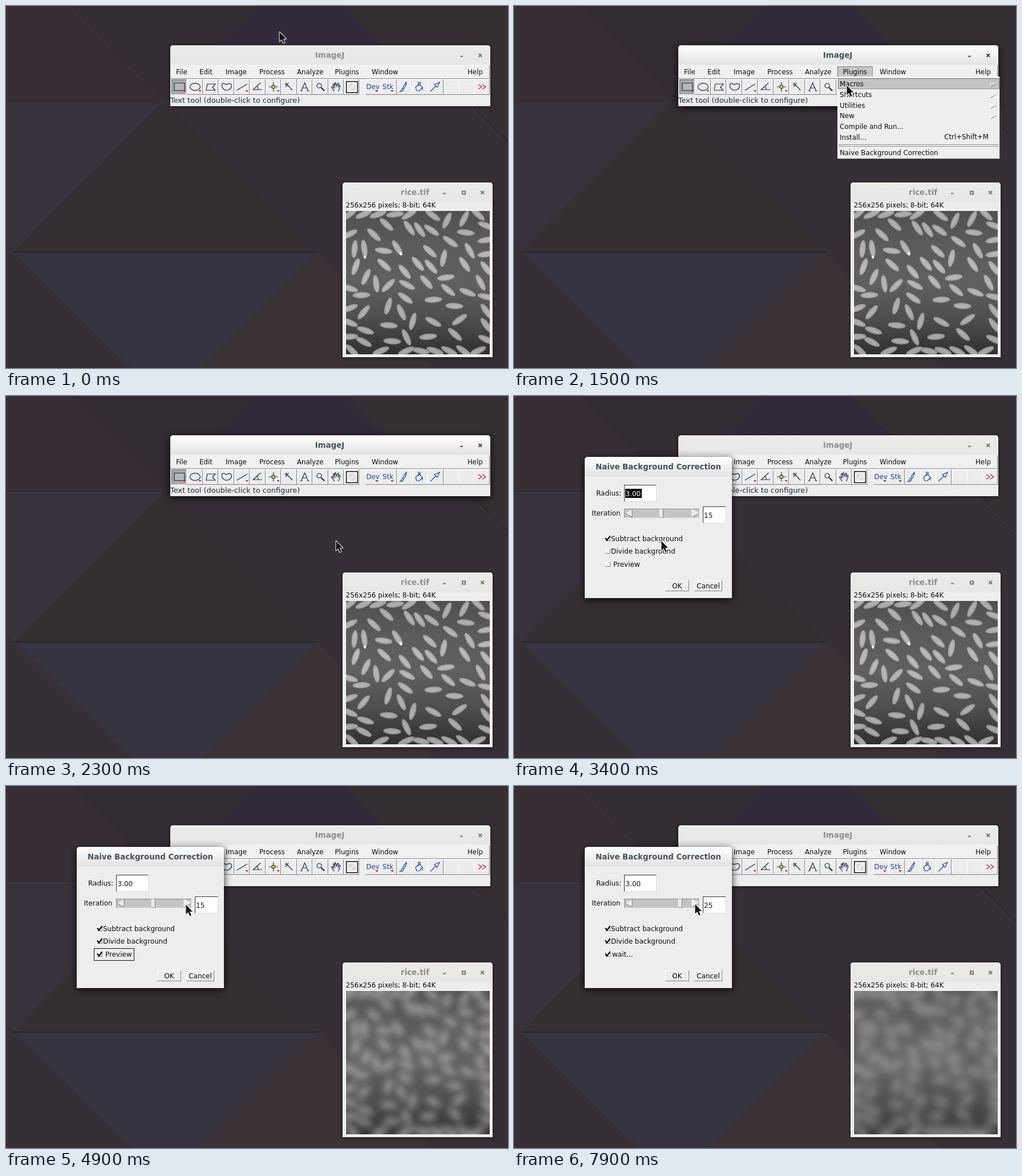
An HTML page with a canvas for the animation above (8 s loop, 880 by 636 pixels).

```html
<!DOCTYPE html>
<html lang="en">
<head>
<meta charset="utf-8">
<title>Background correction</title>
<style>
html, body { margin: 0; width: 100%; height: 100%; overflow: hidden; background: #332c33; }
canvas { display: block; }
</style>
</head>
<body>
<canvas id="stage" width="880" height="636"></canvas>
<script>
const LOOP = 8000, STEP = 100;
const SANS = '"DejaVu Sans", sans-serif';
const F = '12px ' + SANS, MENU = '11.8px ' + SANS, STATUS = '12.86px ' + SANS, BOLD = 'bold 13.33px ' + SANS;
const NAVY = '#1d3048', BLUE = '#24479a', RED = '#c01818';
let c = document.getElementById('stage').getContext('2d');

// ---- drawing helpers
function box(x, y, w, h, fill) { c.fillStyle = fill; c.fillRect(x, y, w, h); }
function frame(x, y, w, h, color) { c.lineWidth = 1; c.strokeStyle = color; c.strokeRect(x + .5, y + .5, w - 1, h - 1); }
function trace(pts) {
  c.beginPath();
  for (let i = 0; i < pts.length; i += 2) c.lineTo(pts[i], pts[i + 1]);
}
function poly(fill, ...pts) { trace(pts); c.fillStyle = fill; c.fill(); }
function line(color, width, ...pts) { trace(pts); c.strokeStyle = color; c.lineWidth = width; c.stroke(); }
function text(s, x, y, font = F, color = '#0c0c0c', align = 'left') {
  c.font = font; c.fillStyle = color; c.textAlign = align; c.fillText(s, x, y);
}
function bevel(x, y, w, h, light, dark) {
  box(x, y, w, 1, light); box(x, y, 1, h, light);
  box(x, y + h - 1, w, 1, dark); box(x + w - 1, y, 1, h, dark);
}
function raised(x, y, w, h, fill = '#ececec') { box(x, y, w, h, fill); bevel(x, y, w, h, '#fff', '#808080'); }
function vertical(y, h, ...stops) {
  const g = c.createLinearGradient(0, y, 0, y + h);
  stops.forEach((s, i) => g.addColorStop(i / (stops.length - 1), s));
  return g;
}

// ---- rice picture: x, y, tilt in degrees
const GRAINS = [
  748,368,35, 773,377,-65, 803,374,-62, 667,384,42, 645,402,43, 707,390,55, 725,393,55,
  746,394,35, 806,398,6, 779,414,35, 611,427,-84, 628,426,82, 662,430,8, 686,425,58,
  743,431,42, 767,443,-78, 813,430,60, 804,454,55, 663,455,42, 722,453,50, 745,458,48,
  613,458,-70, 699,467,50, 631,476,-65, 771,477,-8, 832,486,62, 670,491,-45, 649,488,82,
  703,490,28, 737,485,48, 775,499,40, 809,503,22, 623,508,-3, 700,513,35, 749,516,-3,
  786,527,3, 670,527,-73, 627,538,-50, 693,538,65, 713,554,-75, 749,555,28, 795,551,-35,
  671,561,5, 630,570,18, 627,590,28, 677,589,4, 702,582,65, 740,581,-5, 787,577,42
];
const PX = 596, PY = 360, SIDE = 252;

function sheet() {
  const cv = document.createElement('canvas');
  cv.width = cv.height = SIDE;
  return cv;
}
function seeded(s) { return () => (s = (s * 16807) % 2147483647) / 2147483647; }

function allGrains() {
  const list = [], rnd = seeded(77);
  for (let i = 0; i < GRAINS.length; i += 3) list.push(GRAINS.slice(i, i + 3));
  // cut-off grains along the rim wherever there is room
  const inset = 6, run = SIDE - 2 * inset;
  for (let s = 0; s < 4 * run; s += 5) {
    const side = Math.floor(s / run), d = s % run;
    const x = PX + inset + [d, run, run - d, 0][side];
    const y = PY + inset + [0, d, run, run - d][side];
    if (list.every(g => Math.hypot(g[0] - x, g[1] - y) > 23)) list.push([x, y, rnd() * 90 - 35]);
  }
  return list;
}

function drawRice() {
  const cv = sheet(), old = c;
  c = cv.getContext('2d');
  c.translate(-PX, -PY);
  box(PX, PY, SIDE, SIDE, vertical(PY, SIDE, '#505050', '#5c5c5c', '#606060', '#4e4e4e', '#303030'));
  for (const [x, y, deg] of allGrains()) {
    const lum = 176 - Math.abs(y - 460) * .14;
    c.save();
    c.translate(x, y);
    c.rotate(deg * Math.PI / 180);
    [[16, 5.7, -45], [15, 4.9, 0], [11, 2.6, 10]].forEach(([rx, ry, d]) => {
      const v = Math.round(lum + d);
      c.fillStyle = `rgb(${v},${v},${v})`;
      c.beginPath();
      c.ellipse(0, 0, rx, ry, 0, 0, 7);
      c.fill();
    });
    c.restore();
  }
  for (const [x, y] of [[629, 441], [692, 435]]) {
    c.fillStyle = '#f4f4f4';
    c.beginPath(); c.ellipse(x, y, 2, 3, -.3, 0, 7); c.fill();
  }
  c = old;
  return cv;
}

// repeated mean filtering, approximated by one Gaussian with clamped edges
function smooth(src, passes) {
  const sigma = Math.sqrt(2.9 * passes), r = Math.ceil(sigma * 3), k = [];
  for (let i = -r; i <= r; i++) k.push(Math.exp(-i * i / (2 * sigma * sigma)));
  const sum = k.reduce((a, b) => a + b);
  const pass = a => {
    const out = new Float32Array(SIDE * SIDE);
    for (let y = 0; y < SIDE; y++) for (let x = 0; x < SIDE; x++) {
      let v = 0;
      for (let i = -r; i <= r; i++) v += k[i + r] * a[y * SIDE + Math.min(SIDE - 1, Math.max(0, x + i))];
      out[x * SIDE + y] = v / sum;
    }
    return out;
  };
  const img = src.getContext('2d').getImageData(0, 0, SIDE, SIDE);
  const grey = pass(pass(Float32Array.from({ length: SIDE * SIDE }, (_, i) => img.data[i * 4])));
  grey.forEach((v, i) => img.data.fill(v, i * 4, i * 4 + 3));
  const cv = sheet();
  cv.getContext('2d').putImageData(img, 0, 0);
  return cv;
}

const rice = drawRice(), blurred = {};
for (let n = 15; n <= 24; n++) blurred[n] = smooth(rice, n);

// ---- scenery
function wallpaper() {
  box(0, 0, 880, 636, '#332c33');
  poly('#372f35', 0, 0, 112, 0, 278, 167, 0, 167);
  poly('#32293a', 440, 0, 592, 0, 700, 108, 332, 108);
  poly('#352e33', 592, 0, 880, 0, 880, 238, 700, 108);
  poly('#38323d', 0, 167, 278, 167, 14, 432, 0, 418);
  poly('#352e33', 278, 167, 546, 432, 14, 432);
  poly('#362f37', 278, 167, 820, 178, 546, 432);
  poly('#362f35', 0, 418, 218, 636, 0, 636);
  poly('#393441', 14, 432, 546, 432, 342, 636, 218, 636);
  poly('#3a3236', 546, 432, 750, 636, 342, 636);
  poly('#372f36', 546, 432, 820, 178, 880, 238, 880, 636, 750, 636);
  line('#2d272d', 1, 0, 167.5, 278, 167.5);
  line('#231e23', 1.5, 14, 432.5, 546, 432.5);
  line('#2a242a', 1.5, 820, 178, 880, 238);
}

function win(x, y, w, h, title, mid, active, buttons) {
  c.save();
  c.shadowColor = active ? 'rgba(0,0,0,.85)' : 'rgba(0,0,0,.6)';
  c.shadowBlur = active ? 14 : 6;
  c.shadowOffsetY = active ? 3 : 1;
  c.fillStyle = '#ededed';
  c.beginPath(); c.roundRect(x, y, w, h, [5, 5, 0, 0]); c.fill();
  c.restore();
  c.fillStyle = active ? vertical(y, 34, '#ffffff', '#e2e2e0') : vertical(y, 34, '#ebebe9', '#e6e6e4');
  c.beginPath(); c.roundRect(x, y, w, 34, [5, 5, 0, 0]); c.fill();
  const ink = active ? '#46535c' : '#8e8e8c', mark = active ? '#3c464c' : '#767674';
  text(title, mid, y + 21.5, BOLD, ink, 'center');
  const by = y + 17.5;
  buttons.forEach(([kind, bx]) => {
    if (kind === 'min') box(bx - 2, by + 1, 5, 2, mark);
    if (kind === 'max') { c.lineWidth = 2; c.strokeStyle = mark; c.strokeRect(bx - 2, by - 2, 5, 5); }
    if (kind === 'close') {
      line(mark, 2, bx - 2.5, by - 2.5, bx + 3, by + 3);
      line(mark, 2, bx + 3, by - 2.5, bx - 2.5, by + 3);
    }
  });
}

function icon(x, d, color = NAVY, fill) {
  const p = new Path2D(d);
  c.save();
  c.translate(x, 142);
  if (fill) { c.fillStyle = fill; c.fill(p); }
  c.strokeStyle = color; c.lineWidth = 1.2; c.stroke(p);
  c.restore();
}

const ICONS = [
  'M-9-6.5H9V6.5H-9Z',
  'M-9 0A9 6.3 0 1 1 9 0A9 6.3 0 1 1-9 0Z',
  'M-8 6L-6-5H8L3 1L8 6Z',
  'M-8-3C-8-8-3-5 0-4C3-6 9-7 9-2C9 4 4 6 0 6C-5 6-8 2-8-3Z',
  'M-9 6L9-5',
  'M8 5H-8L5-7M1 5C1 2 0 0-2-1',
  'M-8 0H8M0-8V8',
  'M-6-7L6 6M-7-3L-4-6M-1-7L-3-4M-6 0L-3-3',
  'M-6 7L0-7L6 7M-4 2H4M-8 7H-4M4 7H8',
  'M-6-2A4 4 0 1 1 2-2A4 4 0 1 1-6-2ZM1 1L7 7',
  'M-3 8C-5 4-8 2-8 0C-6-1-5 1-4 2L-5-5C-4-6-3-5-2-1V-7C-1-8 0-7 1-1L3-6C4-7 5-6 4 0L6-3C8-3 7 0 6 3L4 8'
];

function toolbar() {
  const pitch = 27.45;
  for (let i = 0; i < 12; i++) {
    const x = Math.round(290 + i * pitch), w = Math.round(290 + (i + 1) * pitch) - x;
    raised(x, 129, w, 27, i ? '#ececec' : '#a8a8a8');
    if (!i) bevel(x, 129, w, 27, '#666', '#ddd');
    const mid = 304 + i * pitch;
    if (i < 11) icon(mid, ICONS[i], NAVY, i ? null : '#b6b6b6');
    if (i === 6) { box(mid - 2.5, 139.5, 5, 5, '#f0e020'); frame(mid - 3, 139, 6, 6, NAVY); }
    if (i === 9) line(NAVY, 2.4, mid + 2, 144, mid + 7, 149);
    if ([0, 1, 4, 6].includes(i)) poly(RED, mid + 6, 148, mid + 11, 148, mid + 8.5, 151);
  }
  box(596, 132, 21, 21, '#111');
  box(597.5, 133.5, 18, 18, '#fff');
  box(600, 136, 13, 13, '#dcdcdc');
  line('#f8f8f8', 2, 601, 148, 612, 137);
  for (let i = 0; i < 8; i++) {
    const x = Math.round(630 + i * 27.35);
    raised(x, 129, i === 7 ? 27 : 28, 27);
  }
  text('Dev', 643, 146, F, BLUE, 'center');
  text('Stk', 669.5, 146, F, BLUE, 'center');
  for (const x of [650, 677]) poly(RED, x - 3, 148, x + 3, 148, x, 151);
  icon(697, 'M5-8C2-5-1 0-2 3L0 4C3 0 5-4 5-8ZM-2 3C-5 4-3 7-6 8C-2 8 0 7 0 4', BLUE);
  icon(724, 'M-6 1L0-5L6 1L1 7H-4ZM-1-1V-8H2V-3M6 1V6', BLUE);
  icon(752, 'M-8 8L2-2M-1-4L8-8L4 1Z', BLUE);
  icon(835, 'M-7-4L-1 0L-7 4M0-4L6 0L0 4', RED);
}

function mainWindow(active, picked, status) {
  win(288, 69, 561, 107, 'ImageJ', 567.5, active, [['min', 798], ['close', 831]]);
  box(288, 103, 561, 25, '#f0f0f0');
  box(847, 104, 1, 24, '#707070');
  box(288, 127, 561, 1, '#8c8c8c');
  if (picked) { box(567, 106, 62, 19, '#c6c6c6'); bevel(567, 106, 62, 19, '#777', '#999'); }
  [['File', 298], ['Edit', 339], ['Image', 385], ['Process', 444], ['Analyze', 510],
   ['Plugins', 576.5], ['Window', 641], ['Help', 809]].forEach(([s, x]) => text(s, x, 120, MENU));
  toolbar();
  if (status) text('Text tool (double-click to configure)', 288, 170, STATUS, '#1c2a3a');
}

function pictureWindow(pic) {
  win(590, 310, 263, 307, 'rice.tif', 717, false, [['min', 768], ['max', 802], ['close', 835]]);
  text('256x256 pixels; 8-bit; 64K', 595.5, 354);
  box(595, 359, 254, 254, '#fbfbfb');
  c.drawImage(pic, PX, PY);
}

function pluginMenu(y) {
  box(567, 124, 285, 145, '#eeeeee');
  bevel(567, 124, 285, 145, '#fafafa', '#585858');
  const items = ['Macros', 'Shortcuts', 'Utilities', 'New', 'Compile and Run...', 'Install...', 'Naive Background Correction'];
  const tops = items.map((_, i) => i < 6 ? 127 + i * 18.75 : 248);
  const hot = tops.findIndex((top, i) => y >= top && y < top + 19);
  items.forEach((s, i) => {
    const top = Math.round(tops[i]);
    if (i === hot) { box(568, top, 283, 19, '#c4c4c4'); bevel(568, top, 283, 19, '#707070', '#909090'); }
    text(s, 571, top + 13.7, MENU);
    if (i < 4) { line('#fff', 1, 835, top + 15, 835, top + 8, 845, top + 11); line('#777', 1, 835, top + 15.5, 845, top + 10); }
  });
  text('Ctrl+Shift+M', 832, 234, MENU, '#0c0c0c', 'right');
  box(569, 243, 281, 1, '#8a8a8a');
  box(569, 246, 281, 1, '#8a8a8a');
}

function field(x, y, w, h) { box(x, y, w, h, '#fff'); bevel(x, y, w, h, '#333', '#d8d8d8'); }

function check(y, on, label, x) {
  raised(160, y, 9, 9, '#f2f2f2');
  if (on) line('#080808', 2.2, 160, y + 3.5, 163, y + 7.5, 168.5, y);
  text(label, x, y + 9);
}

function dialog(s) {
  win(124, 107, 258, 248, 'Naive Background Correction', 253, true, []);
  text('Radius:', 144, 175);
  field(193, 156, 57, 30);
  if (s.selected) box(195, 163, 29, 16, '#000');
  text('3.00', 195.5, 175.5, F, s.selected ? '#fff' : '#2a1226');
  text('Iteration', 136.5, 210, MENU);

  box(193, 198, 133, 17, '#c4c4c4');
  bevel(193, 198, 133, 17, '#8a8a8a', '#f4f4f4');
  poly('#ececec', 207, 199, 207, 213, 195, 206);
  line('#777', 1, 195, 206, 207, 213, 207, 199);
  poly('#ececec', 312, 199, 312, 213, 324, 206);
  line('#777', 1, 312, 213, 324, 206);
  line('#fff', 1, 312, 213, 312, 199, 324, 206);
  raised(Math.round(254.5 + (s.value - 15) * 3.33), 199, 7, 15, '#e8e8e8');
  field(331, 194, 41, 30);
  text(s.value, 333, 213.5, F, '#2a1226');

  check(246, true, 'Subtract background', 170);
  check(268, s.divide, 'Divide background', 170);
  check(291, s.preview, s.busy ? 'wait...' : 'Preview', s.busy ? 172 : 174);
  if (s.focus === 'divide') frame(155, 262, 133, 22, '#111');
  if (s.focus === 'preview') frame(154, 285, 71, 22, '#111');

  raised(265, 324, 42, 19); text('OK', 286, 338, F, '#0c0c0c', 'center');
  raised(316, 324, 49, 19); text('Cancel', 340.5, 338, F, '#0c0c0c', 'center');
}

const ARROW = new Path2D('M0 0V16.5L3.9 12.9L6.7 19.5L9.3 18.4L6.5 12H11.6Z');
function pointer(x, y) {
  c.save();
  c.translate(x + .5, y + .8);
  c.lineJoin = 'round';
  c.lineWidth = 2; c.strokeStyle = '#f4f4f4'; c.stroke(ARROW);
  c.fillStyle = '#141214'; c.fill(ARROW);
  c.restore();
}

// ---- timing
const PATH = [[300, 479, 45], [1200, 583, 118], [1300, 583, 118], [2100, 584, 254], [2200, 584, 254],
  [3400, 258, 254], [3600, 165, 270], [3900, 163, 290], [4000, 163, 290], [4800, 315, 208], [4900, 315, 208], [5200, 317, 207]];
const CLICKS = [5700, 5900, 6200, 6400, 6600, 6900, 7100, 7300, 7600, 7900];
const DONE = [4100, 5700, 6000, 6200, 6500, 6700, 6900, 7200, 7400, 7700];
const passed = (times, t) => times.filter(x => t >= x).length;

function pointerAt(t) {
  const i = PATH.findIndex(k => k[0] > t);
  if (i === 0) return PATH[0].slice(1);
  if (i < 0) return PATH[PATH.length - 1].slice(1);
  const [t0, x0, y0] = PATH[i - 1], [t1, x1, y1] = PATH[i];
  const p = (t - t0) / (t1 - t0), e = p * p * (3 - 2 * p);
  return [Math.round(x0 + (x1 - x0) * e), Math.round(y0 + (y1 - y0) * e)];
}

function render(t) {
  const [x, y] = pointerAt(t);
  const value = 15 + passed(CLICKS, t), shown = 14 + passed(DONE, t);
  const menuOpen = t >= 1300 && t < 2200;
  const preview = t >= 3900;
  wallpaper();
  pictureWindow(blurred[shown] || rice);
  mainWindow(t >= 1300 && t < 2500, menuOpen || (t < 1300 && x >= 567 && y >= 104), t < 4100);
  if (menuOpen) pluginMenu(y);
  if (t >= 2500) dialog({
    value, preview,
    busy: preview && shown < value,
    selected: t < 3600,
    divide: t >= 3600,
    focus: t >= 5700 || t < 3600 ? '' : preview ? 'preview' : 'divide'
  });
  pointer(x, y);
}

let last = -1;
function tick() {
  const t = Math.floor(performance.now() % LOOP / STEP) * STEP;
  if (t !== last) render(last = t);
  requestAnimationFrame(tick);
}
tick();
</script>
</body>
</html>
```
